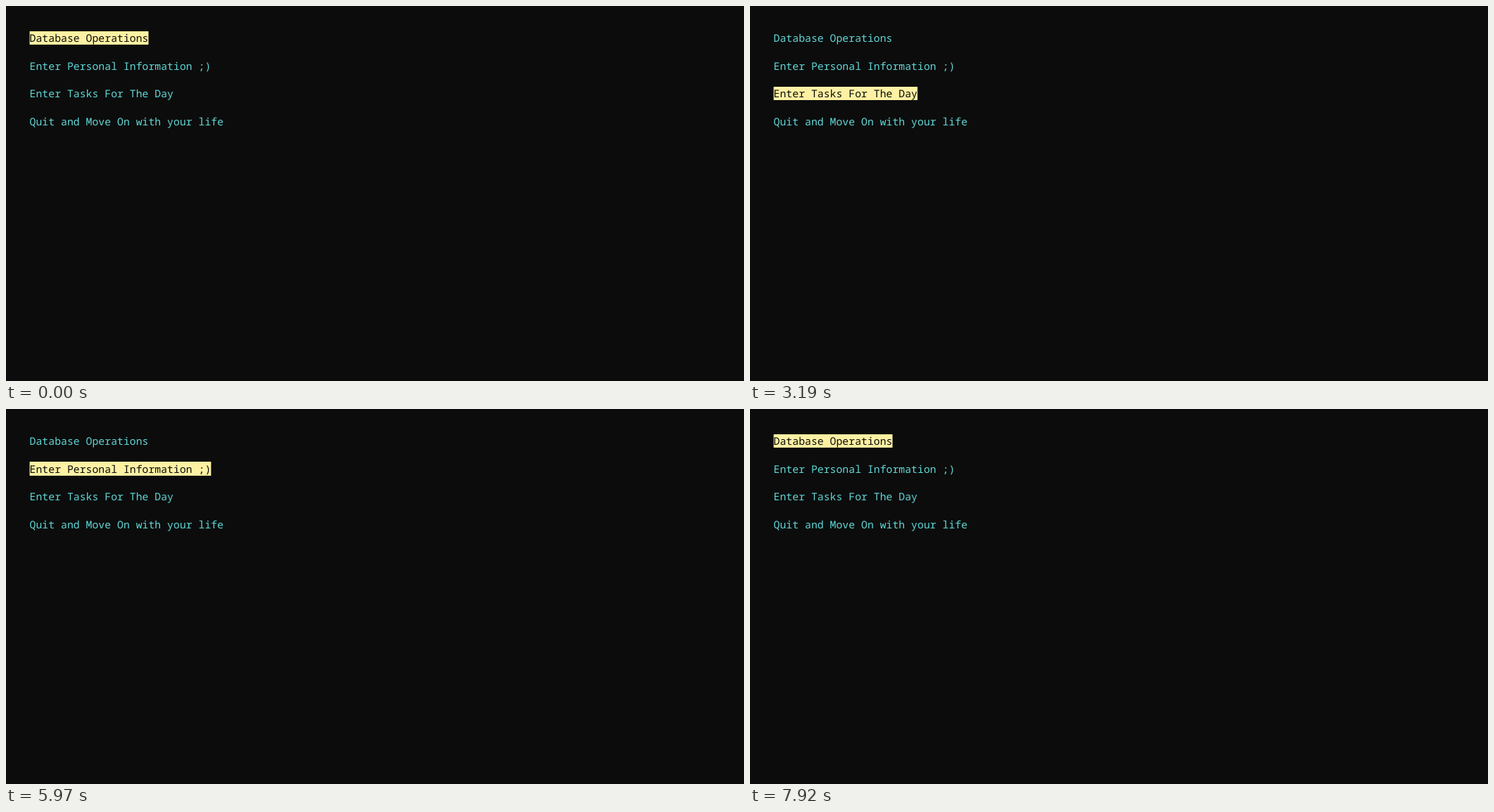
Write an HTML page that moves like this. It is 1049 px wide and 534 px high and loops after 8 s.

```html
<!DOCTYPE html>
<html lang="en">
<head>
<meta charset="utf-8">
<title>Terminal menu</title>
<style>
  html, body { margin: 0; width: 100%; height: 100%; overflow: hidden; background: #0c0c0c; }
  svg { display: block; width: 100%; height: 100%; }
  text {
    font: 14.82px "Noto Sans Mono", "DejaVu Sans Mono", monospace;
    text-rendering: geometricPrecision;
    fill: #61d6d6;
  }
  rect { fill: #fef1a3; }
  .selected { fill: #0c0c0c; }
  .title { fill: #f2f2f2; }
</style>
</head>
<body>
<svg id="stage" viewBox="0 0 1049 534"></svg>
<script>
const LOOP = 8000, CELL = 8.892, LEFT = 33.6, ROW = 39.53;

const main = {
  items: ["Database Operations", "Enter Personal Information ;)",
          "Enter Tasks For The Day", "Quit and Move On with your life"]
};
const contactItems = ["Add Contact To Database", "Remove Contact From Database", "Go Back To Main menu"];
const contactsLoading = { items: contactItems };
const contacts = { items: contactItems, title: "Contact Infomation", column: 66 };
const tasks = {
  items: ["Enter A Task", "Compose Email", "Go Back To Main menu"],
  title: "Current Email Body", column: 68
};

// [start time in ms, screen, selected item]
const timeline = [
  [0, main, 0], [530, main, 1], [1310, main, 2], [2410, main, 3],
  [3190, main, 2], [3490, main, 1], [3890, main, 0],
  [4200, contactsLoading, 0], [4350, contacts, 0], [5130, contacts, 1], [5360, contacts, 2],
  [5590, main, 0], [5970, main, 1], [6140, main, 2],
  [6440, tasks, 0], [7450, tasks, 1], [7620, tasks, 2],
  [7920, main, 0]
];

const stage = document.getElementById("stage");
const columnX = column => LEFT + column * CELL;
const label = (text, x, y, style = "") => `<text class="${style}" x="${x}" y="${y}">${text}</text>`;

function menuItem(text, row, selected) {
  const offset = row * ROW;
  const top = Math.round(35.6 + offset), bottom = Math.round(55.4 + offset);
  const bar = selected
    ? `<rect x="${LEFT}" y="${top}" width="${text.length * CELL}" height="${bottom - top}"/>` : "";
  return bar + label(text, LEFT, Math.round(51.3 + offset), selected ? "selected" : "");
}

function render(screen, selection) {
  let markup = screen.items.map((text, row) => menuItem(text, row, row === selection)).join("");
  if (screen.title) {
    markup += label(screen.title, columnX(screen.column), 51, "title")
            + label("=".repeat(41), columnX(55), 72, "title");
  }
  stage.innerHTML = markup;
}

let shown;
function tick() {
  const time = performance.now() % LOOP;
  const step = timeline.findLast(([start]) => start <= time);
  if (step !== shown) {
    shown = step;
    render(step[1], step[2]);
  }
  requestAnimationFrame(tick);
}
tick();
</script>
</body>
</html>
```
